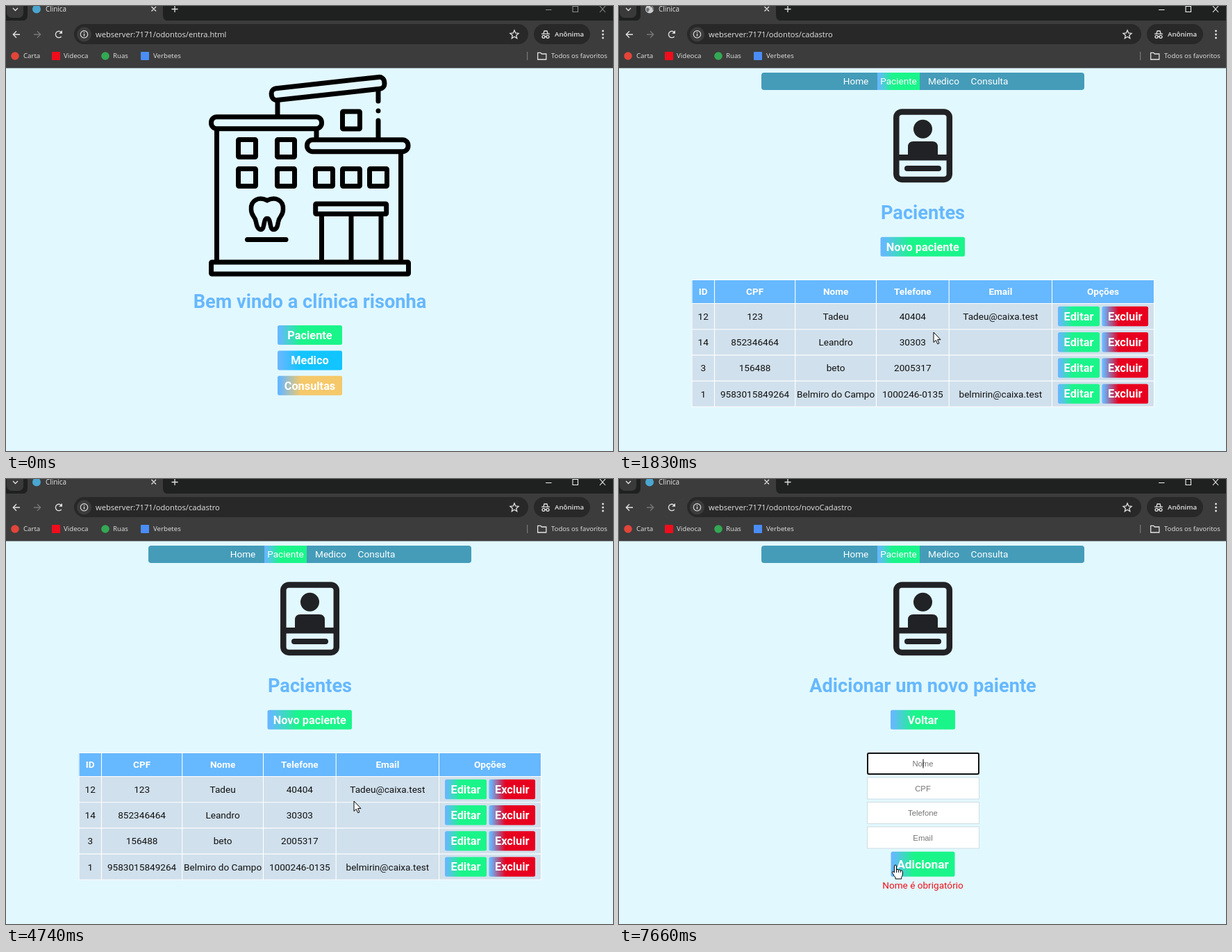
An HTML page for the animation above (8 s loop, 874x641 px).

```html
<!DOCTYPE html>
<html lang="pt-BR">
<head>
<meta charset="utf-8">
<title>Clinica</title>
<style>
html, body { margin: 0; width: 100%; height: 100%; overflow: hidden; background: #e2f8ff; }
svg { display: block; width: 100%; height: 100%; }
.ui { font-family: "Open Sans", "Noto Sans", sans-serif; fill: #e3e3e3; }
.page { font-family: Roboto, sans-serif; font-size: 13.6px; text-anchor: middle; }
.bold { font-weight: 700; }
.title { font-weight: 700; font-size: 27.2px; fill: #66b8ff; }
.hint { font-family: "Liberation Sans", Arial, sans-serif; font-size: 11.33px; fill: #757575; }
.line { fill: none; stroke: #e3e3e3; stroke-width: 1.3; }
</style>
</head>
<body>
<svg id="stage" viewBox="0 0 874 641" preserveAspectRatio="none"></svg>
<script>
const LOOP = 8000;
const MID = 437.5;
const stage = document.getElementById('stage');

// ---- markup helpers ----
const attrs = o => Object.entries(o).map(([k, v]) => `${k}="${v}"`).join(' ');
const rect = (x, y, w, h, o = {}) =>
  `<rect x="${x}" y="${y}" width="${w}" height="${h}" ${attrs(o)}/>`;
const circle = (x, y, r, o = {}) => `<circle cx="${x}" cy="${y}" r="${r}" ${attrs(o)}/>`;
const path = (d, o = {}) => `<path d="${d}" ${attrs(o)}/>`;
const text = (x, y, s, o = {}) => `<text x="${x}" y="${y}" ${attrs(o)}>${s}</text>`;
const group = (id, body, o = {}) => `<g id="${id}" ${attrs(o)}>${body}</g>`;
const line = (d, o = {}) => path(d, { class: 'line', ...o });

const gradient = (id, color) => `<linearGradient id="${id}">
  <stop offset="0.03" stop-color="#66b8ff"/><stop offset="0.36" stop-color="${color}"/></linearGradient>`;

function button(x, y, w, h, label, fill, size = 16.32) {
  return rect(x, y, w, h, { rx: 2.5, fill: `url(#${fill})` }) +
    text(x + w / 2, y + h / 2 + 5.8, label, { class: 'bold', 'font-size': size, fill: '#fff' });
}

// ---- browser frame ----
function browser() {
  const marks = [
    ['Carta', 25, 13, '#e2453a'], ['Videoca', 83, 72, '#f00d1c'],
    ['Ruas', 154, 143, '#34a853'], ['Verbetes', 212, 200, '#4a8df5']
  ].map(([name, x, cx, color]) =>
    (name === 'Videoca' || name === 'Verbetes'
      ? rect(cx - 6, 66, 12, 12, { rx: 1, fill: color }) : circle(cx, 72, 5.8, { fill: color })) +
    text(x, 75.4, name, { 'font-size': 9.7 })).join('');

  return rect(0, 0, 874, 22, { fill: '#1f2020' }) +
    rect(0, 21, 874, 68.5, { fill: '#3c3c3c' }) +
    rect(1, -10, 24, 27, { rx: 7, fill: '#3a3a3a' }) +
    line('M10 3l3.5 3.5L17 3') +
    path('M23 21.5Q31 21.5 31 13V0H226V13Q226 21.5 234 21.5Z', { fill: '#3c3c3c' }) +
    group('globe', circle(44, 4.5, 6, { fill: '#c9cbcc' }) +
      path('M39.5 3q3-1 4 1t-1 3l-1 2q-3-2-2-6M45 0q0 2 2 2t1 3l2 1q1-4-2-6z', { fill: '#6b6e70' })) +
    circle(44, 4.5, 6, { id: 'badge', fill: '#4aa6d0' }) +
    text(57, 8.3, 'Clinica', { 'font-size': 9.9 }) +
    line('M209.5 1l6.5 6.5M216 1l-6.5 6.5M238.5 4.5h9M243 0v9') +
    group('controls', path('M777 5.5h8.5M816 .5h7.5v8h-7.5zM855 0l8 9M863 0l-8 9'),
      { fill: 'none', 'stroke-width': 1.1 }) +
    line('M20 41H10.5M15 36.3L10.3 41l4.7 4.7', { 'stroke-width': 1.5 }) +
    line('M40 41h9.5M45 36.3l4.7 4.7l-4.7 4.7', { style: 'stroke:#777' }) +
    group('reload', line('M79.7 44A4.7 4.7 0 1 1 79.5 37.7', { 'stroke-width': 1.5 }) +
      path('M81 35v4.8h-4.8z', { fill: '#e3e3e3' })) +
    group('stop', line('M72 36.7l8 8M80 36.7l-8 8', { 'stroke-width': 1.5 })) +
    rect(98, 26, 654, 29, { rx: 14.5, fill: '#282828' }) +
    circle(112.5, 40.8, 10.5, { fill: '#3c3c3c' }) +
    circle(112.5, 40.8, 5.2, { class: 'line', style: 'stroke-width:1.1' }) +
    line('M112.5 40v3.6M112.5 37.7v1.3') +
    text(129, 44.8, '', { id: 'url', 'font-size': 11.15 }) +
    line('M732 35l1.7 4l4.3.4l-3.3 2.8l1 4.3l-3.7-2.3l-3.7 2.3l1-4.3l-3.3-2.8l4.3-.4z', { 'stroke-width': 1.1 }) +
    rect(760, 26, 81, 29, { rx: 14.5, fill: '#282828' }) +
    line('M771 40.2h12M774 39.5l1-3.5h4l1 3.5M775.7 44.2q1.3-1 2.6 0') +
    circle(774, 44.3, 2, { class: 'line' }) + circle(780, 44.3, 2, { class: 'line' }) +
    text(790, 44.3, 'Anônima', { 'font-size': 9.7, 'font-weight': 600 }) +
    [36, 41, 46].map(y => circle(859.5, y, 1.4, { fill: '#e3e3e3' })).join('') +
    marks +
    rect(750, 66, 1.2, 12, { fill: '#777' }) +
    line('M765.6 67.3h4.2l1.5 1.7h6.5v8h-12.2z', { 'stroke-width': 1.1 }) +
    text(785, 75.4, 'Todos os favoritos', { 'font-size': 9.55 });
}

// ---- pages ----
function building() {
  const panes = [[331, 189], [387, 189], [331, 231], [387, 231],
    [442, 231], [481, 231], [520, 231], [481, 148.5]]
    .map(([x, y]) => rect(x + 3.5, y + 3.5, 25, 25, { rx: 1 })).join('');
  return `<g fill="none" stroke="#000" stroke-width="7" stroke-linecap="round">` +
    rect(381.8, 110.5, 163.5, 17, { rx: 7.5, transform: 'rotate(-6.3 463.5 119)' }) +
    rect(295.5, 159.7, 159, 17, { rx: 8 }) +
    rect(433.5, 192.7, 145.5, 17, { rx: 8 }) +
    rect(295.5, 369, 284, 17, { rx: 1 }) +
    rect(445.7, 285, 102, 14.5, { rx: 1 }) + panes +
    path('M303.5 178V368M568.5 211V368M391 138V158M447 179V190M536 121V137M536 151v.01M536 165V190') +
    path('M454.5 301V368M497 301V368M540 301V368M347.5 336.5H403') +
    path('M376 280C364 274 352 280 353 293C353 303 359 303 360 311C361 317 363 322 367 322' +
      'C373 322 370 306 376 306C382 306 379 322 385 322C390 322 391 317 392 311' +
      'C393 303 399 303 399 293C400 280 388 274 376 280Z', { 'stroke-width': 6.5 }) + '</g>';
}

function homePage() {
  return building() +
    text(MID, 434.6, 'Bem vindo a clínica risonha', { class: 'title' }) +
    button(391, 460, 93, 28, 'Paciente', 'green') +
    button(391, 496.5, 93, 28, 'Medico', 'cyan') +
    button(391, 532.7, 93, 28, 'Consultas', 'amber');
}

function header() {
  const items = [['Home', 341], ['Paciente', 402.5], ['Medico', 467.5], ['Consulta', 533.5]];
  return rect(205, 96, 465, 25, { rx: 4, fill: '#449cb9' }) +
    rect(372, 96, 61, 25, { fill: 'url(#green)' }) +
    items.map(([s, x]) => text(x, 113.2, s, { fill: '#fff' })).join('') +
    `<g fill="#212225">` +
    rect(399.3, 152.4, 76.5, 97.5, { rx: 8, fill: 'none', stroke: '#212225', 'stroke-width': 8.5 }) +
    circle(437.5, 177.2, 13.5) +
    path('M416 216V203q0-8 8-8h27q8 0 8 8V216Z') +
    rect(398, 214, 79, 8.5) + rect(411, 230, 53, 8, { rx: 4 }) + '</g>';
}

function listPage() {
  const cols = [105, 137.5, 253.7, 370.5, 475.2, 623.5, 770.5];
  const heads = ['ID', 'CPF', 'Nome', 'Telefone', 'Email', 'Opções'];
  const rows = [
    ['12', '123', 'Tadeu', '40404', 'Tadeu@caixa.test'],
    ['14', '852346464', 'Leandro', '30303', ''],
    ['3', '156488', 'beto', '2005317', ''],
    ['1', '9583015849264', 'Belmiro do Campo', '1000246-0135', 'belmirin@caixa.test']
  ];
  const center = i => (cols[i] + cols[i + 1]) / 2;
  const rowTop = i => 428.5 + i * 37.2;
  let out = text(MID, 307.3, 'Pacientes', { class: 'title' }) +
    button(376.5, 332.7, 121.5, 28, 'Novo paciente', 'green') +
    rect(104.5, 394.5, 666, 34, { fill: '#66b8ff' }) +
    rect(104.5, 428.5, 666, 148.8, { fill: '#d0e0ec' }) +
    heads.map((s, i) => text(center(i), 416.3, s, { class: 'bold', fill: '#fff' })).join('');
  rows.forEach((row, i) => {
    const y = rowTop(i);
    out += row.map((s, c) => text(center(c), y + 23.4, s, { fill: '#111' })).join('') +
      button(632, y + 4.3, 60, 28.4, 'Editar', 'green') +
      button(695.5, y + 4.3, 66.5, 28.4, 'Excluir', 'red');
  });
  const grid = cols.map(x => `M${x} 394.5V577.3`).join('') +
    [394.5, ...[0, 1, 2, 3, 4].map(rowTop)].map(y => `M104.5 ${y}H771`).join('');
  return out + path(grid, { stroke: '#fff', 'stroke-width': 1.1, fill: 'none' });
}

function formPage() {
  const fields = ['Nome', 'CPF', 'Telefone', 'Email'].map((s, i) => {
    const y = 394.5 + i * 35.5;
    return rect(357.5, y, 161, 31, { fill: '#fff', stroke: '#cfdde2' }) +
      text(MID, y + 19.5, s, { class: 'hint' });
  }).join('');
  return text(MID, 307.3, 'Adicionar um novo paiente', { class: 'title' }) +
    button(391, 332.7, 93, 28, 'Voltar', 'green') + fields +
    button(391.5, 536.8, 92, 36, 'Adicionar', 'green', 17.3) +
    group('error', rect(358, 395, 160, 30, { rx: 2, fill: 'none', stroke: '#111', 'stroke-width': 2 }) +
      rect(437.5, 403.5, 1, 13, { fill: '#111' }) +
      text(MID, 590.3, 'Nome é obrigatório', { fill: '#f01018' }));
}

function pointers() {
  const arrow = path('M0 0V14.5L3.3 11.4L5.8 16.8L8 15.8L5.6 10.6H10Z');
  const hand = path('M-1.6 2Q-1.6 0 0 0T1.6 2V7Q3 5.5 4.4 7.2Q6 6 7.2 7.8Q9.8 7 10.3 9.7V13' +
    'Q10.3 16 8.7 17.5V20H0V18Q-2 16 -3.5 12.7Q-5.5 10.5 -4 9.5Q-2.8 9 -1.6 11Z') +
    path('M1.6 7v4M4.4 7.4v3.4M7.2 8v2.8', { fill: 'none' });
  const beam = path('M-3-8h1.5Q0-8 0-6.5Q0-8 1.5-8H3M0-6.5V6.5M-3 8h1.5Q0 8 0 6.5Q0 8 1.5 8H3', { fill: 'none' });
  return group('arrow', arrow) + group('hand', hand) + group('beam', beam);
}

stage.innerHTML = '<defs>' + gradient('green', '#1af58a') + gradient('cyan', '#12c4ff') +
  gradient('amber', '#f5c869') + gradient('red', '#e8001f') + '</defs>' +
  rect(0, 0, 874, 641, { fill: '#e2f8ff' }) +
  group('frame', browser(), { class: 'ui' }) +
  `<g class="page">${group('home', homePage())}${group('header', header())}` +
  `${group('list', listPage())}${group('form', formPage())}</g>` +
  circle(0, 0, 10, { id: 'click', fill: '#eae400', opacity: 0.75 }) +
  group('pointer', pointers(), { fill: '#fff', stroke: '#000', 'stroke-width': 1, 'stroke-linejoin': 'round' });

// ---- motion ----
// Each move: start, end, number of positions, then keys [position, x, y].
const moves = [
  [450, 1080, 10, [[0, 741, 608], [3, 620, 540], [6, 510, 492], [9, 453, 470]]],
  [2340, 3100, 12, [[0, 478, 456], [3, 600, 396], [4, 676, 418], [5, 701, 392], [6, 650, 344],
    [8, 480, 327], [10, 384, 420], [11, 375, 502]]],
  [3160, 3920, 12, [[0, 352, 500], [2, 340, 474], [5, 420, 453], [8, 515, 482], [10, 490, 518], [11, 475, 515]]],
  [3990, 3990, 1, [[0, 475, 522]]],
  [4740, 5230, 8, [[0, 501, 464], [3, 474, 395], [5, 448, 352], [7, 438, 335]]],
  [6890, 7240, 6, [[0, 437, 347], [3, 430, 400], [5, 427, 421]]],
  [7580, 7580, 1, [[0, 405, 522]]],
  [7660, 7660, 1, [[0, 398, 556]]]
];

function pointerAt(t) {
  const move = moves.filter(m => t >= m[0]).pop();
  if (!move) return null;
  const [start, end, count, keys] = move;
  const span = end - start;
  const k = span ? Math.min(count - 1, Math.floor((t - start) / span * (count - 1) + 1e-6)) : 0;
  const i = Math.max(1, keys.findIndex(key => key[0] >= k));
  const b = keys[Math.min(i, keys.length - 1)];
  const a = keys[i - 1];
  const f = b[0] > a[0] ? (k - a[0]) / (b[0] - a[0]) : 0;
  return [a[1] + (b[1] - a[1]) * f, a[2] + (b[2] - a[2]) * f];
}

const within = (x, y, l, t, r, b) => x >= l && x <= r && y >= t && y <= b;

function pointerKind(page, x, y) {
  if (page === 'home') return within(x, y, 391, 460, 484, 561) ? 'hand' : 'arrow';
  if (page === 'list') return within(x, y, 376, 333, 498, 361) ? 'hand' : 'arrow';
  if (within(x, y, 391, 333, 484, 361) || within(x, y, 391, 537, 484, 573)) return 'hand';
  return within(x, y, 357, 394, 519, 532) ? 'beam' : 'arrow';
}

const el = {};
stage.querySelectorAll('[id]').forEach(n => { el[n.id] = n; });
const show = (id, on) => { el[id].style.display = on ? '' : 'none'; };
const between = (t, a, b) => t >= a && t < b;
const host = 'webserver:7171/odontos/';
const urls = { home: 'entra.html', list: 'cadastro', form: 'novoCadastro' };

function draw(t) {
  const page = t < 1830 ? 'home' : t < 6420 ? 'list' : 'form';
  for (const id of ['home', 'list', 'form']) show(id, id === page);
  show('header', page !== 'home');
  el.url.textContent = host + urls[page];

  const loading = between(t, 1760, 1830);
  const globe = between(t, 1830, 1950) || between(t, 6420, 6690);
  show('stop', loading);
  show('reload', !loading);
  show('globe', globe);
  show('badge', !loading && !globe);
  el.controls.setAttribute('stroke', t < 1550 ? '#8b8b8b' : '#f2f2f2');
  show('error', t >= 7660);

  const first = between(t, 1550, 1760);
  show('click', first || between(t, 6220, 6420));
  el.click.setAttribute('transform', first ? 'translate(452 470)' : 'translate(438 335)');

  const pos = pointerAt(t);
  show('pointer', pos);
  if (pos) {
    const kind = pointerKind(page, ...pos);
    for (const id of ['arrow', 'hand', 'beam']) show(id, id === kind);
    el.pointer.setAttribute('transform', `translate(${pos[0]} ${pos[1]})`);
  }
}

const origin = performance.now();
function tick() {
  draw((performance.now() - origin) % LOOP);
  requestAnimationFrame(tick);
}
tick();
</script>
</body>
</html>
```
